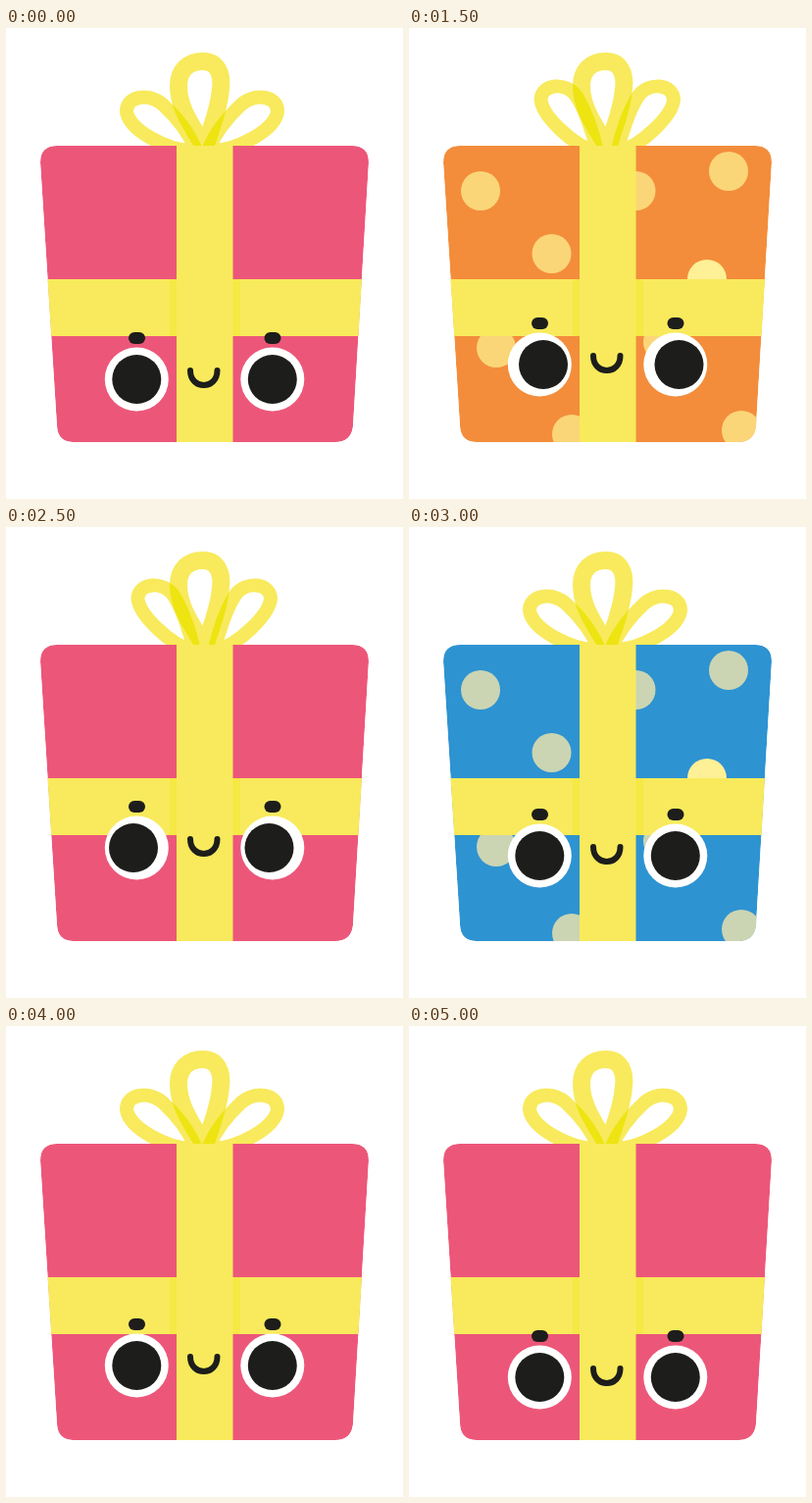
An HTML page that plays this animation: 405 by 480 pixels, repeating every 5500 ms.

```html
<!DOCTYPE html>
<html lang="en">
<head>
<meta charset="utf-8">
<title>Gift box</title>
<style>
  html, body { margin: 0; width: 100%; height: 100%; overflow: hidden; background: #fff; }
  svg { display: block; width: 100%; height: 100%; }
</style>
</head>
<body>
<svg viewBox="0 0 405 480">
  <defs>
    <path id="box" d="M52 120H353Q370 120 370 137L354 406Q352 422 336 422H69Q53 422 52 406L35 137Q35 120 52 120Z"/>
    <path id="middle" d="M203 122C190 100 176 82 176 59C176 43 186 34 201 34C215 34 221 46 219 62C217 86 208 104 203 122Z"/>
    <g id="sides">
      <path id="loop"/>
      <use id="mirror" href="#loop"/>
    </g>
    <clipPath id="boxClip"><use href="#box"/></clipPath>
    <mask id="overlap" maskUnits="userSpaceOnUse" x="0" y="0" width="405" height="480">
      <use href="#middle" fill="none" stroke="#fff" stroke-width="18"/>
    </mask>
  </defs>

  <g fill="none" stroke="#f8ea5c" stroke-linejoin="round">
    <use href="#sides" stroke-width="14"/>
    <use href="#middle" stroke-width="18"/>
    <g mask="url(#overlap)"><use href="#sides" stroke="#ede411" stroke-width="14"/></g>
  </g>

  <g clip-path="url(#boxClip)">
    <use id="paper" href="#box"/>
    <g id="dots"></g>
    <path fill="#f8ea5c" d="M30 256H375V314H30ZM174 120H231.500V422H174Z"/>
    <path fill="#f6e845" d="M167 256h7v58h-7zM231.500 256h7.500v58h-7.500z"/>
  </g>

  <g id="face">
    <g fill="#fff"><circle cx="133.300" r="32.500"/><circle cx="271.800" r="32.500"/></g>
    <g id="pupils" fill="#1d1d1b"><circle cx="133.300" r="25"/><circle cx="271.800" r="25"/></g>
    <g fill="#1d1d1b">
      <rect x="125" y="-48" width="17" height="12" rx="6"/>
      <rect x="263.500" y="-48" width="17" height="12" rx="6"/>
    </g>
    <path d="M188 -9C188 11 215.500 11 215.500 -9" fill="none" stroke="#1d1d1b" stroke-width="6" stroke-linecap="round"/>
  </g>
</svg>
<script>
const $ = id => document.getElementById(id);
const STEP = 500, STEPS = 11;

const PINK = { paper: '#ec5779' };
const BLUE = { paper: '#2e93d1', dots: '#cbd5b3' };
const ORANGE = { paper: '#f38d3b', dots: '#fbd678' };

const BOW_LOW = { mirror: 400, d: 'M190 125C165 125 125 104 123 85C123 69 145 66 160 78C175 92 188 110 194 125' };
const BOW_HIGH = { mirror: 404.5, d: 'M190 126C168 120 136 90 134.500 73C135 57 160 54 171 70C180 84 188 108 192 126' };

// Poses play forward, then back.
const poses = [
  { wrap: PINK, eyeY: 358, look: 0 },
  { wrap: BLUE, eyeY: 349, look: -3.3 },
  { wrap: PINK, eyeY: 346, look: 0 },
  { wrap: ORANGE, eyeY: 343, look: 3.7 },
  { wrap: BLUE, eyeY: 335, look: 0 },
  { wrap: PINK, eyeY: 327, look: -3.3 }
];

const spots = [[73, 166], [145.5, 230], [231.5, 166], [326, 146], [304, 256], [89, 326], [166, 414], [339, 410], [259, 320]];
const BRIGHT_SPOT = 4;
spots.forEach(([x, y], i) => {
  const c = document.createElementNS('http://www.w3.org/2000/svg', 'circle');
  c.setAttribute('cx', x);
  c.setAttribute('cy', y);
  c.setAttribute('r', 20);
  if (i === BRIGHT_SPOT) c.setAttribute('fill', '#fdf096');
  $('dots').append(c);
});

function draw(time) {
  const step = Math.floor(time / STEP) % STEPS;
  const index = Math.min(step, STEPS - 1 - step);
  const { wrap, eyeY, look } = poses[index];
  const bow = index % 2 ? BOW_HIGH : BOW_LOW;

  $('loop').setAttribute('d', bow.d);
  $('mirror').setAttribute('transform', `translate(${bow.mirror} 0) scale(-1 1)`);
  $('paper').setAttribute('fill', wrap.paper);
  $('dots').setAttribute('fill', wrap.dots || 'none');
  $('dots').setAttribute('visibility', wrap.dots ? 'visible' : 'hidden');
  $('face').setAttribute('transform', `translate(0 ${eyeY})`);
  $('pupils').setAttribute('transform', `translate(${look} 0)`);
}

const start = performance.now();
function tick() {
  draw(performance.now() - start);
  requestAnimationFrame(tick);
}
tick();
</script>
</body>
</html>
```
